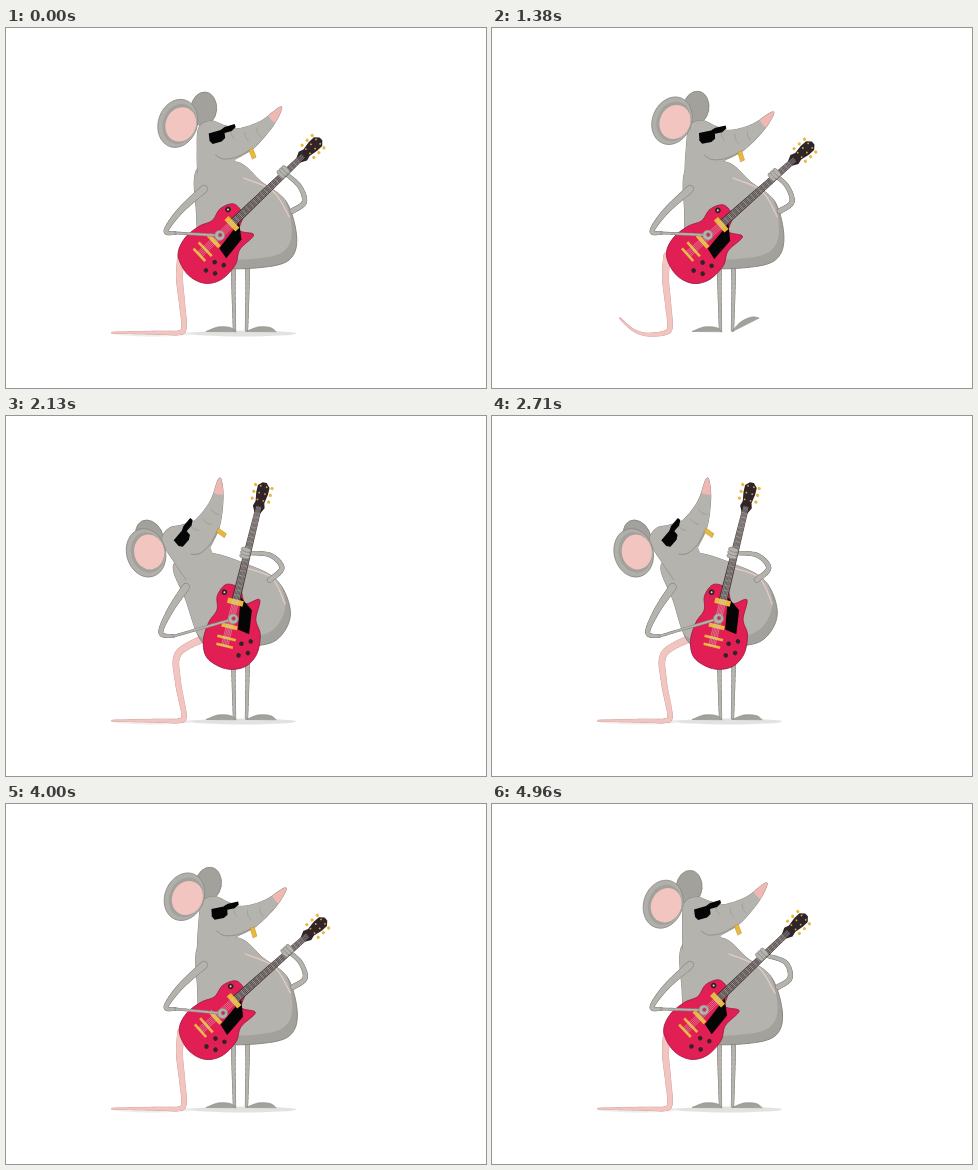
An HTML page with a canvas that plays this animation: 480x360 px, repeating every 5 s.

```html
<!DOCTYPE html>
<html lang="en">
<head>
<meta charset="utf-8">
<title>Guitar mouse</title>
<style>
html, body { margin: 0; width: 100%; height: 100%; overflow: hidden; background: #fff; }
canvas { display: block; width: 480px; height: 360px; }
</style>
</head>
<body>
<canvas id="stage" width="480" height="360"></canvas>
<script>
const ctx = document.getElementById('stage').getContext('2d');
const LOOP = 5000, FPS = 24, BEAT = LOOP / 12;
const GRAY = '#b5b3ad', SHADE = '#a3a19b', LINE = '#8a8882', PINK = '#f2c5c0';
const RED = '#e21f55', GOLD = '#e9b83e', DARK = '#2f2529', BLACK = '#060506';

const clamp = x => Math.min(1, Math.max(0, x));
const mix = (a, b, k) => a + (b - a) * k;
const mixPts = (a, b, k) => a.map(([x, y], i) => [mix(x, b[i][0], k), mix(y, b[i][1], k)]);
const wave = p => 0.5 - 0.5 * Math.cos(2 * Math.PI * p);

function ramp(t, from, to) {
  const x = clamp((t - from) / (to - from));
  return x * x * (3 - 2 * x);
}

// Points along a Catmull-Rom spline through the given points.
function curve(pts, closed) {
  const n = pts.length, out = [];
  const at = i => closed ? pts[(i + n) % n] : pts[Math.min(n - 1, Math.max(0, i))];
  for (let i = 0; i < (closed ? n : n - 1); i++) {
    const [a, b, c, d] = [at(i - 1), at(i), at(i + 1), at(i + 2)];
    for (let s = 0; s < 1; s += 0.125) {
      out.push([0, 1].map(k => b[k] + 0.5 * s * (c[k] - a[k]
        + s * (2 * a[k] - 5 * b[k] + 4 * c[k] - d[k] + s * (3 * (b[k] - c[k]) + d[k] - a[k])))));
    }
  }
  if (!closed) out.push(pts[n - 1]);
  return out;
}

function path(pts, closed) {
  ctx.beginPath();
  for (const [x, y] of pts) ctx.lineTo(x, y);
  if (closed) ctx.closePath();
}

function stroke(color, w) {
  ctx.strokeStyle = color;
  ctx.lineWidth = w;
  ctx.stroke();
}

function paint(fill, line, w = 0.8) {
  ctx.fillStyle = fill;
  ctx.fill();
  if (line) stroke(line, w);
}

function oval(x, y, rx, ry, turn, fill, line) {
  ctx.beginPath();
  ctx.ellipse(x, y, rx, ry, turn, 0, 7);
  paint(fill, line);
}

const dot = (x, y, r, fill, line) => oval(x, y, r, r, 0, fill, line);

function bar(u, half, w, color) {
  ctx.fillStyle = color;
  ctx.fillRect(u - w / 2, -half, w, half * 2);
}

// A limb whose width runs from w0 to w1.
function taper(pts, w0, w1, fill, line) {
  const c = curve(pts);
  for (const [color, edge] of [[line, 1.2], [fill, 0]]) {
    for (let i = 1; i < c.length; i++) {
      path([c[i - 1], c[i]]);
      stroke(color, mix(w0, w1, i / c.length) + edge);
    }
  }
}

function shadow(x, w, alpha) {
  ctx.globalAlpha = alpha;
  oval(x, 305.5, w, 3, 0, '#e2e2e1');
  ctx.globalAlpha = 1;
}

function drawTail(lean, lift) {
  const pts = mixPts([[175, 228], [173.5, 250], [176, 275]],
    [[198, 222], [172, 238], [172, 266]], lean);
  pts.push([178, 299]);
  for (let i = 0; i <= 4; i++) {
    const k = i / 4;
    pts.push([mix(173, 106 + 22 * lift, k), 304.7 + lift * (3 * Math.sin(3 * k) - 15 * k ** 3)]);
  }
  taper(pts, 6.5, 0.7, PINK, '#dcaea9');
}

function drawLegs(tap) {
  for (const s of [-1, 1]) taper([[234.5 + 7 * s, 232], [234.5 + 7 * s, 260], [234.5 + 6 * s, 302]], 4, 2, GRAY, LINE);
  for (const [x, lift] of [[200, 0], [240, tap]]) {
    ctx.save();
    ctx.translate(x, 303.5);
    ctx.rotate(-0.47 * lift);
    path(curve([[0, 0], [12, -4.5], [24, -4], [30, 0]]), true);
    paint(SHADE, LINE, 0.6);
    ctx.restore();
  }
}

function drawBody(lean, sway) {
  const shear = ([x, y]) => [x + sway * 4 * clamp((240 - y) / 80), y];
  const shape = curve(mixPts(
    [[191, 140], [190, 185], [195, 222], [215, 239], [255, 239.5],
      [283, 232], [290.5, 210], [280, 174], [255, 154], [230, 134]],
    [[166, 148], [179, 185], [193, 222], [210, 234], [240, 231],
      [270, 224], [283.5, 198], [270, 165], [238, 148], [199, 137]], lean).map(shear), true);
  ctx.save();
  path(shape, true);
  paint(SHADE, LINE, 1);
  ctx.clip();
  ctx.translate(-5, -9);
  path(shape, true);
  paint(GRAY);
  ctx.restore();
  path(curve(mixPts([[237, 150], [266, 163], [283, 189]],
    [[238, 152], [264, 162], [278, 188]], lean).map(shear)));
  stroke('#e6c9c3', 1.3);
}

// Draws in the upright head's coordinates; dx, dy shift loose parts.
function inHead(pose, dx, dy, draw) {
  const { lean, nod, sway } = pose;
  ctx.save();
  ctx.translate(mix(210, 197, lean) + 4 * sway, mix(150, 157, lean));
  ctx.rotate(-0.58 * lean);
  ctx.translate(0, -30);
  ctx.rotate(0.1 * nod);
  ctx.translate(dx - 210, dy - 120);
  draw();
  ctx.restore();
}

function drawHead() {
  const skull = curve([[191, 145], [190.5, 125], [192, 100], [204, 93], [218, 97.5], [232, 100.5],
    [254, 93], [272, 79.5], [274.5, 82], [266, 98], [248, 119], [229, 131]]);
  path(skull);
  stroke(LINE, 1);
  path([...skull, [225, 150]]);
  paint(GRAY);
  ctx.save();
  ctx.clip();
  dot(279, 78, 20, '#f1b8b3');
  ctx.restore();
  path(curve([[209, 127], [217, 131], [230, 129], [243, 122]]));
  stroke(LINE, 0.8);
  for (const [x, y] of [[224, 102], [238, 104], [250, 100]]) {
    path(curve([[x, y], [x + 1, y + 5], [x + 4, y + 9]]));
    stroke('#999791', 0.7);
  }
  path([[242, 122], [246, 120], [249.5, 129], [246, 131]], true);
  paint(GOLD, '#b98a2c', 0.5);
  path([[202, 105.5], [217.5, 101], [218.5, 110], [215, 113.5], [206, 116], [203, 113]], true);
  paint(BLACK);
  path([[214, 102], [218, 99], [228, 96], [229, 99], [225, 103], [218, 105]], true);
  paint(BLACK);
}

function frontEar() {
  oval(171, 95.5, 19.5, 24.5, 0.32, '#b1afa9', LINE);
  oval(172.5, 96, 16.5, 20.5, 0.32, SHADE);
  oval(174, 96.5, 15, 17.5, 0.4, PINK);
}

function drawGuitar() {
  path(curve([[-29, 6], [-23, -14], [-7, -22], [12, -21], [26, -16], [40, -19], [53, -13],
    [52, 1], [39, 10], [46, 23], [26, 24], [12, 32], [-8, 33], [-23, 24]], true), true);
  paint(RED, '#9a1a40', 0.8);
  path([[44, 4], [34, 18], [10, 21], [12, 9]], true);
  paint(BLACK);
  for (let i = 0; i < 4; i++) dot(-1 - 12 * (i >> 1) + 4.5 * (i % 2), 15.8 + 8.5 * (i % 2), 2.3, DARK);
  dot(45, -13, 2.8, DARK);
  dot(45, -13, 1, '#e9cfc0');

  path([[36, -4], [134, -2.7], [134, 2.7], [36, 4]], true);
  paint('#4a4142', DARK, 0.6);
  for (let u = 45; u < 132; u += 5) bar(u, 3, 0.7, '#86807e');

  const edge = [[130, 3], [136, 6], [141, 4.5], [150, 6], [157, 6], [161, 2]];
  path([...edge, ...edge.map(([u, v]) => [u, -v]).reverse()], true);
  paint(DARK);
  for (let u = 143; u < 158; u += 7) {
    for (const s of [-1, 1]) {
      dot(u, s * 8.5, 1.6, GOLD);
      dot(u, s * 3, 0.9, '#e7a548');
    }
  }

  bar(-7, 8.5, 2.6, GOLD);
  bar(1, 9.5, 2.6, GOLD);
  bar(13, 8, 4, GOLD);
  bar(38, 8, 5.5, GOLD);
  for (let i = -2; i <= 2; i++) {
    path([[-7, i * 1.6], [136, i * 1.05]]);
    stroke('rgba(212,206,200,.85)', 0.5);
  }
}

function render(t) {
  const p = t / BEAT % 1;
  const lean = ramp(t, 1670, 2040) - 1.45 * ramp(t, 2770, 3000) + 0.45 * ramp(t, 3000, 3370);
  const calm = clamp(1.3 - 3 * Math.abs(lean));
  const nod = wave(p + 0.05) * clamp(1 - lean);
  const sway = wave(p + 0.13);
  const tap = ramp(p, 0, 0.1) * (1 - ramp(p, 0.36, 0.52)) * calm;
  const lift = Math.sin(Math.PI * clamp((p - 0.02) / 0.55)) ** 2 * calm;
  const drop = Math.exp(-(((p - 0.88) / 0.1) ** 2)) * calm;
  const strum = 2 * Math.sin(4 * Math.PI * p);
  const pose = { lean, nod, sway };

  ctx.fillStyle = '#fff';
  ctx.fillRect(0, 0, 480, 360);
  ctx.lineCap = ctx.lineJoin = 'round';

  shadow(237, 53, 1 - tap);
  shadow(147, 40, (1 - lift) * 0.6);
  drawTail(lean, lift);
  drawLegs(tap);
  inHead(pose, -13 * lean, 8 * lean + 2.5 * drop, () => oval(197, 81, 13, 17, 0.1, SHADE, LINE));
  drawBody(lean, sway);
  inHead(pose, 0, 0, drawHead);
  inHead(pose, 4 * nod + lean, 5 * drop + 5.5 * lean, frontEar);

  const gx = 198 + 21 * Math.abs(lean) + 3 * sway, gy = 222 + lean;
  const turn = -0.763 - 0.567 * lean + 0.045 * nod;
  const onGuitar = (u, v) => [gx + u * Math.cos(turn) - v * Math.sin(turn),
    gy + u * Math.sin(turn) + v * Math.cos(turn)];
  const fret = onGuitar(mix(111, 88, lean) - 10 * drop, -2);
  const pick = onGuitar(21, strum);

  const reach = mixPts([[293, 158], [298, 174], [286, 183]],
    [[263, 139], [275, 152], [263, 164]], lean).map(([x, y]) => [x + 2 * sway, y]);
  taper([fret, ...reach], 3, 4.5, GRAY, LINE);

  ctx.save();
  ctx.translate(gx, gy);
  ctx.rotate(turn);
  drawGuitar();
  ctx.restore();

  for (let i = -1; i <= 1; i++) {
    const [x, y] = onGuitar(mix(111, 88, lean) - 10 * drop + 3.4 * i, -2);
    oval(x, y, 2.2, 5, turn, GRAY, LINE);
  }

  const arm = mixPts([[198, 161], [174, 183], [160, 203]],
    [[179, 171], [163, 195], [154, 217]], lean).map(([x, y]) => [x + 2 * sway * clamp(lean), y]);
  const wrist = mixPts([[170, 205]], [[168, 220]], lean)[0];
  taper([...arm, wrist], 7, 1.8, GRAY, LINE);
  taper([wrist, pick], 1.6, 1.6, GRAY, LINE);
  dot(...pick, 5, GRAY, LINE);
  dot(pick[0] + 0.5, pick[1] - 0.5, 2, RED, LINE);
}

const start = performance.now();
function loop() {
  const t = (performance.now() - start) % LOOP;
  render(Math.floor(t * FPS / 1000) * 1000 / FPS);
  requestAnimationFrame(loop);
}
loop();
</script>
</body>
</html>
```
